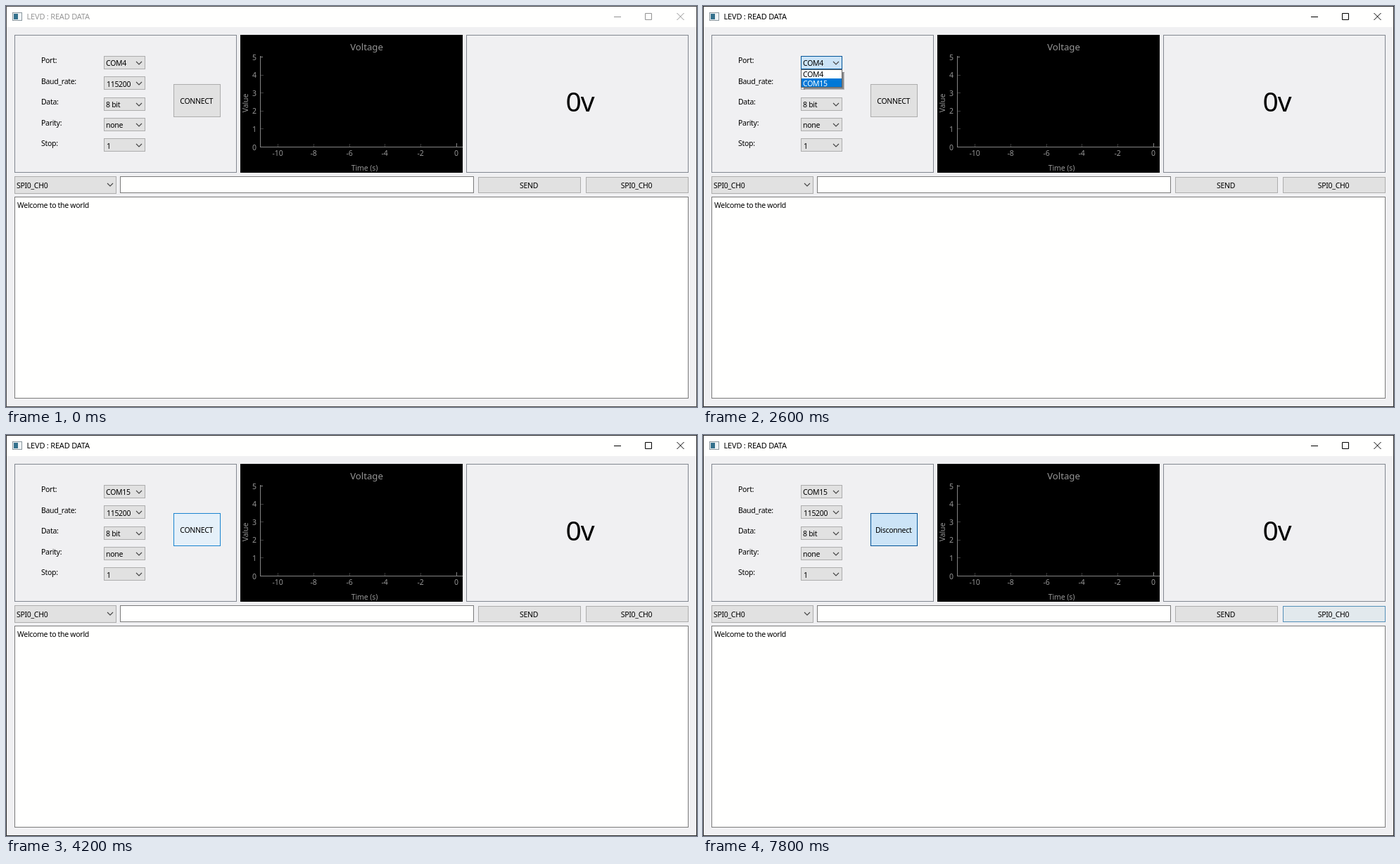
An HTML page for the animation above (8 s loop, 982x570 px).

```html
<!DOCTYPE html>
<html lang="en">
<head>
<meta charset="utf-8">
<title>Read data</title>
<style>
html, body { margin: 0; width: 100%; height: 100%; overflow: hidden; background: #f0f0f2; }
svg { display: block; width: 982px; height: 570px; }
text { font: 10.5px "Noto Sans", "Open Sans", sans-serif; letter-spacing: -.3px; fill: #000; }
.mid { text-anchor: middle; }
.end { text-anchor: end; }
.box { fill: none; stroke: #828790; }
.field { fill: #fffffe; stroke: #7a7a7a; }
.btn { fill: #e1e1e1; stroke: #adadad; }
.chev { fill: none; stroke: #444; stroke-width: 1.1; }
.plot text { fill: #969696; letter-spacing: -.1px; }
.plot .head { font-size: 13.2px; letter-spacing: 0; }
.title { font-size: 11px; letter-spacing: -.2px; }
.volt { font-size: 39px; letter-spacing: -1px; }

/* one shared 8 s clock, hard changes only */
.title, .frame, .glyph, .port, .baud, .link, .channel, .popup, .row, .item1, .item2,
.v1, .v2, .l1, .l2, .auto { animation: 8s step-end infinite; }
.title { animation-name: wake-text; }
.frame { animation-name: wake-frame; fill: none; }
.glyph { animation-name: wake-line; fill: none; }
.port { animation-name: port; }
.baud { animation-name: baud; }
.link { animation-name: link; }
.channel { animation-name: channel; }
.popup { animation-name: popup; }
.row { animation-name: row; }
.item1 { animation-name: item1; }
.item2 { animation-name: item2; }
.v1 { animation-name: until-pick; }
.v2 { animation-name: from-pick; }
.l1 { animation-name: until-link; }
.l2 { animation-name: from-link; }
.auto { animation-name: auto; }

@keyframes wake-text { 0% { fill: #969696; } 12.5%, 100% { fill: #000; } }
@keyframes wake-frame { 0% { stroke: #4c4c4c; } 12.5%, 100% { stroke: #2a2a2a; } }
@keyframes wake-line { 0% { stroke: #929292; } 12.5%, 100% { stroke: #000; } }
@keyframes port {
  0% { fill: #e1e1e1; stroke: #adadad; }
  7.5% { fill: #e3f1fa; stroke: #2b8fae; }
  17.5% { fill: #d8eaf8; stroke: #1a6ba8; }
  22.5% { fill: #cce4f7; stroke: #005499; }
  40%, 100% { fill: #e1e1e1; stroke: #adadad; }
}
@keyframes baud {
  0% { fill: #e1e1e1; stroke: #adadad; }
  40% { fill: #e5f1fb; stroke: #0078d7; }
  47.5% { fill: #e4ecf3; stroke: #458fc6; }
  50% { fill: #e2e5e8; stroke: #8aa2b5; }
  52.5%, 100% { fill: #e1e1e1; stroke: #adadad; }
}
@keyframes link {
  0% { fill: #e1e1e1; stroke: #adadad; }
  47.5% { fill: #e5f0f9; stroke: #1a84d0; }
  60%, 100% { fill: #cce4f7; stroke: #005499; }
}
@keyframes channel {
  0% { fill: #e1e1e1; stroke: #adadad; }
  97.5%, 100% { fill: #e2e9ed; stroke: #5590b8; }
}
@keyframes popup { 0% { visibility: hidden; } 17.5% { visibility: visible; } 37.5%, 100% { visibility: hidden; } }
@keyframes row { 0% { transform: none; } 25%, 100% { transform: translateY(12px); } }
@keyframes item1 { 0% { fill: #fff; } 25%, 100% { fill: #000; } }
@keyframes item2 { 0% { fill: #000; } 25%, 100% { fill: #fff; } }
@keyframes until-pick { 0% { opacity: 1; } 37.5%, 100% { opacity: 0; } }
@keyframes from-pick { 0% { opacity: 0; } 37.5%, 100% { opacity: 1; } }
@keyframes until-link { 0% { opacity: 1; } 62.5%, 100% { opacity: 0; } }
@keyframes from-link { 0% { opacity: 0; } 62.5%, 100% { opacity: 1; } }
@keyframes auto { 0% { opacity: 0; } 80% { opacity: .8; } 85%, 100% { opacity: 0; } }
</style>
</head>
<body>
<svg viewBox="0 0 982 570">
  <defs>
    <path id="chev" class="chev" d="M-4 -2l4 4 4-4"/>
  </defs>

  <!-- window -->
  <rect width="982" height="570" fill="#f0f0f2"/>
  <rect width="982" height="30" fill="#fffffe"/>
  <rect class="frame" x=".5" y=".5" width="981" height="569"/>
  <rect x="9.5" y="9.5" width="13" height="11" fill="#eef3f5" stroke="#8b979e"/>
  <rect x="11" y="11" width="6" height="8" fill="#33708c"/>
  <text class="title" x="29.5" y="19">LEVD : READ DATA</text>
  <path class="glyph" d="M864 15.5h10M908.5 10.5h9v9h-9zM953.5 10l10 10M963.5 10l-10 10"/>

  <!-- serial settings -->
  <rect class="box" x="12.5" y="41.5" width="315" height="195"/>
  <text x="50" y="81">Port:</text>
  <text x="50" y="110.500">Baud_rate:</text>
  <text x="50" y="140">Data:</text>
  <text x="50" y="169.500">Parity:</text>
  <text x="50" y="199">Stop:</text>

  <rect class="btn port" x="139.5" y="71.500" width="58" height="18"/>
  <rect class="btn baud" x="139.5" y="100.500" width="58" height="18"/>
  <rect class="btn" x="139.5" y="130.500" width="58" height="18"/>
  <rect class="btn" x="139.5" y="159.500" width="58" height="18"/>
  <rect class="btn" x="139.5" y="188.500" width="58" height="18"/>
  <use href="#chev" x="189" y="81"/>
  <use href="#chev" x="189" y="110"/>
  <use href="#chev" x="189" y="140"/>
  <use href="#chev" x="189" y="169"/>
  <use href="#chev" x="189" y="198"/>
  <text class="v1" x="142" y="85">COM4</text>
  <text class="v2" x="142" y="85">COM15</text>
  <text x="143" y="114.500">115200</text>
  <text x="142" y="144">8 bit</text>
  <text x="142" y="173">none</text>
  <text x="143" y="202.500">1</text>

  <rect class="btn link" x="238.500" y="111.500" width="66" height="46"/>
  <text class="mid l1" x="270.700" y="139">CONNECT</text>
  <text class="mid l2" x="270.700" y="139">Disconnect</text>

  <!-- port list -->
  <g class="popup">
    <path d="M143 116h55V94h3v25H143z" fill="#8a8a8c"/>
    <path d="M145 118.500h56M200.500 95v24" stroke="#b9b9bb"/>
    <rect x="139.500" y="90.500" width="58" height="25" fill="#fff" stroke="#646464"/>
    <rect class="row" x="140" y="91" width="57" height="12" fill="#0078d7"/>
    <text class="item1" x="142" y="101">COM4</text>
    <text class="item2" x="142" y="113.500">COM15</text>
  </g>

  <!-- voltage plot -->
  <g class="plot">
    <rect x="333" y="41" width="316" height="196" fill="#000"/>
    <text class="mid head" x="512.500" y="63">Voltage</text>
    <text class="mid" transform="translate(344 138) rotate(-90)">Value</text>
    <text class="mid" x="509.500" y="234">Time (s)</text>
    <path d="M361.500 71v130M361 200.500h288M361 72.500h4M640.500 195v6" fill="none" stroke="#858585"/>
    <path d="M362 98.500h4m-4 25h4m-4 26h4m-4 25h4M386.500 196v4m51-4v4m51-4v4m50-4v4m51-4v4" fill="none" stroke="#969696" opacity=".4"/>
    <g class="end">
      <text x="356" y="77">5</text>
      <text x="356" y="102">4</text>
      <text x="356" y="128">3</text>
      <text x="356" y="153">2</text>
      <text x="356" y="179">1</text>
      <text x="356" y="204.500">0</text>
    </g>
    <g class="mid">
      <text x="386" y="213">-10</text>
      <text x="437" y="213">-8</text>
      <text x="488" y="213">-6</text>
      <text x="538" y="213">-4</text>
      <text x="589" y="213">-2</text>
      <text x="640" y="213">0</text>
    </g>
    <g class="auto">
      <rect x="333.500" y="223.500" width="13" height="13" rx="2" fill="#4a4a4a" stroke="#8c8c8c"/>
      <text class="mid" x="340" y="234">A</text>
    </g>
  </g>

  <!-- reading -->
  <rect class="box" x="654.500" y="41.500" width="315" height="195"/>
  <text class="mid volt" x="815.500" y="150">0v</text>

  <!-- command row -->
  <rect class="btn" x="12.500" y="242.500" width="144" height="24"/>
  <use href="#chev" x="148" y="254"/>
  <text x="15" y="258.500">SPI0_CH0</text>
  <rect class="field" x="162.500" y="242.500" width="502" height="23"/>
  <rect class="btn" x="671.500" y="243.500" width="145" height="22"/>
  <text class="mid" x="743" y="258.500">SEND</text>
  <rect class="btn channel" x="824.500" y="243.500" width="145" height="22"/>
  <text class="mid" x="896" y="258.500">SPI0_CH0</text>

  <!-- log -->
  <rect class="field" x="12.500" y="271.500" width="957" height="286"/>
  <text x="16" y="287">Welcome to the world</text>
</svg>
</body>
</html>
```
